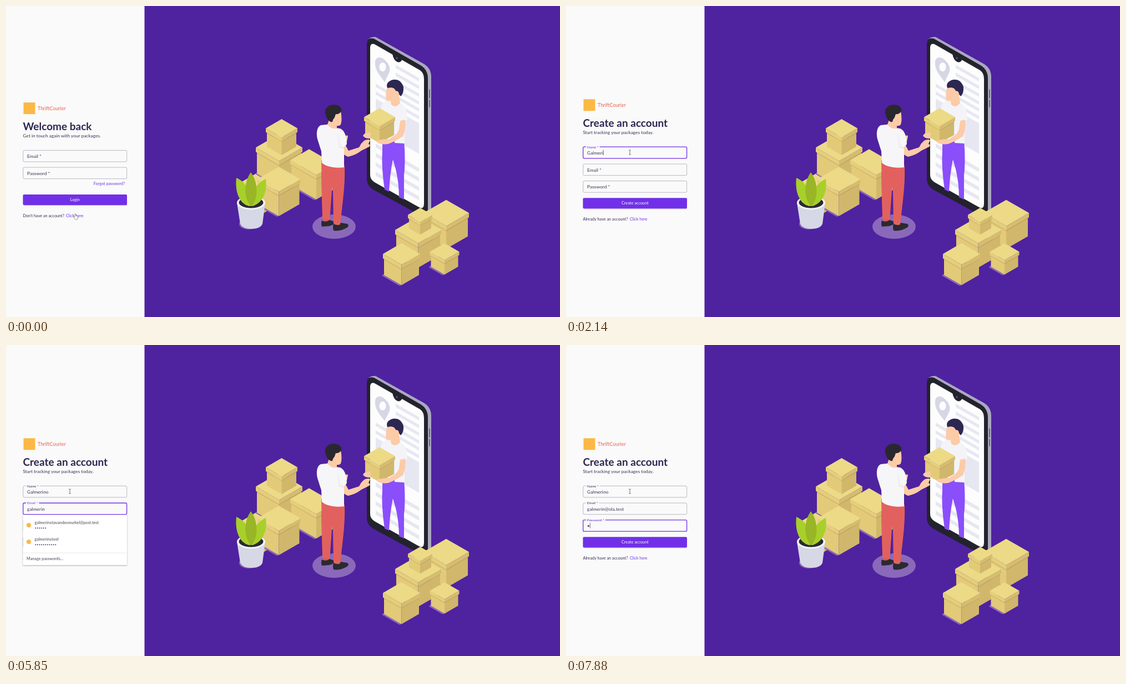
These frames come from a looping animation (998x561 px, 8 s). An HTML page with a canvas:

```html
<!DOCTYPE html>
<html lang="en">
<head>
<meta charset="utf-8">
<title>Sign up</title>
<style>
  html, body { margin: 0; width: 100%; height: 100%; overflow: hidden; background: #4f22a0; }
  canvas, svg { position: absolute; left: 0; top: 0; width: 100%; height: 100%; display: block; }
  text { font-family: Lato, sans-serif; white-space: pre; }
</style>
</head>
<body>
<canvas id="art" width="998" height="561"></canvas>
<svg id="ui" viewBox="0 0 998 561" preserveAspectRatio="none"></svg>
<script>
const LOOP = 8000;
const INK = '#3a2f53', VIOLET = '#7130e8', PAPER = '#fafafa', SHADE = '#8a69ba', SKIN = '#fccba8';

// ---------- illustration ----------
const ctx = document.getElementById('art').getContext('2d');

function shape(color, d) {
  ctx.fillStyle = color;
  ctx.fill(new Path2D(d));
}

function poly(color, pts) {
  shape(color, 'M' + pts.map(p => p.join(' ')).join('L') + 'Z');
}

function oval(color, x, y, rx, ry) {
  ctx.fillStyle = color;
  ctx.beginPath();
  ctx.ellipse(x, y, rx, ry, 0, 0, Math.PI * 2);
  ctx.fill();
}

// Isometric carton: x, y is the nearest corner of the lid top, a and b its reach left and right.
function carton(x, y, a, b, lid, h, shadow) {
  const s = 0.577, inset = 2, base = lid + h;
  const L = (d, v) => [x - d, y - d * s + v];
  const R = (d, v) => [x + d, y - d * s + v];
  const wall = (color, P, w, top, bottom) => poly(color, [P(0, top), P(w, top), P(w, bottom), P(0, bottom)]);
  if (shadow) poly(SHADE, [L(a - inset, base - 2), L(0, base), [x - 4, y + base + 1], [x - a - 2, y - a * s + base + 2]]);
  wall('#e2ca79', L, a - inset, lid, base);
  wall('#d1b76b', R, b - inset, lid, base);
  wall('#cfb566', L, a - inset, lid, lid + 1.3);
  wall('#c0a55c', R, b - inset, lid, lid + 1.3);
  wall('#e5ce7c', L, a, 0, lid);
  wall('#d5bc6f', R, b, 0, lid);
  poly('#ecda86', [[x, y], L(a, 0), [x - a + b, y - (a + b) * s], R(b, 0)]);
}

// Slanted bar on the phone screen.
function bar(x0, x1, y, h) {
  const drop = (x1 - x0) * 0.57;
  poly('#e7e7f2', [[x0, y], [x1, y + drop], [x1, y + drop + h], [x0, y + h]]);
}

function phone() {
  shape('#aaa8bf', 'M651 66Q653 54 666 56L752 104Q766 112 766 128L766 370L756 376L740 366Z');
  shape('#22232d', 'M650 70Q650 55 663 59L747 107Q760 115 760 131L760 368Q759 381 746 377L661 331Q650 324 650 312Z');
  const screen = 'M656 76Q656 66 664 69L746 116Q753 121 753 132L753 356Q753 368 744 363L664 318Q656 313 656 305Z';
  shape('#fdfdfe', screen);
  ctx.save();
  ctx.clip(new Path2D(screen));
  for (let i = 0; i < 4; i++) bar(702, 744, 106 + i * 14, 6);
  for (let i = 0; i < 2; i++) bar(666, 744, 140 + i * 14, 6);
  bar(666, 744, 167, 55);
  for (let i = 0; i < 4; i++) bar(666, 744, 248 + i * 17, 7);
  ctx.restore();
  shape('#d6d6e5', 'M665 101C666 92 674 90 682 97C690 104 694 113 690 121L682 137L676 129C669 120 664 111 665 101Z');
  oval('#fdfdfe', 678.5, 110, 6, 8);
  shape('#22232d', 'M696 86L714 96Q711 103 705 101Q698 98 696 86Z');
  oval('#4d4d5d', 704, 94, 1.8, 2.2);
  shape('#6c5f9d', 'M762 150L764 151L764 167L762 166ZM762 169L764 170L764 183L762 182Z');
}

function courier() {
  shape('#8a4efb', 'M678 246L717 242Q720 280 717 305L717 349L708 345Q708 320 702 294L697 277Q692 300 690 335L682 331Q676 290 678 262Z');
  shape('#f4f4f8', 'M691 169Q678 172 676 181L674 191L700 200L700 247L718 248L718 208L723 205Q723 184 712 176L707 172Z');
  shape(SKIN, 'M686 148Q683 163 685 170Q689 173 693 171L694 178Q702 185 710 175L708 163Q713 155 707 150L700 145Z');
  shape('#2d2653', 'M687 148Q683 137 697 133Q711 131 716 146Q717 157 711 163L708 159Q708 153 702 153Q700 147 693 147Z');
  carton(673, 216.5, 28, 28, 7, 24);
  shape(SKIN, 'M710 207L719 205Q721 222 715 235Q700 245 688 249Q671 251 667 244Q675 240 689 240Q703 235 708 223Z');
  shape(SKIN, 'M657 228Q645 228 643 234Q647 240 656 239Z');
}

function customer() {
  oval(SHADE, 591, 398, 39, 22);
  shape('#d95a5d', 'M588 318L583 389Q577 391 571 387L569 345L568 300Z');
  shape('#2b2a30', 'M569 387Q576 391 583 386L592 389Q592 395 582 397L569 398Q567 393 569 387Z');
  shape('#2b2a30', 'M590 393Q597 397 603 391L615 393Q620 397 612 401Q600 407 590 405Q588 399 590 393Z');
  shape('#e2615f', 'M568 278L610 288Q611 315 607 350L602 394Q596 397 590 392L589 335L587 325L583 385L570 384L569 345Z');
  shape(SKIN, 'M610 236Q615 231 616 235L614 244Q611 246 609 244Z');
  shape(SKIN, 'M600 253Q604 268 616 272Q630 269 640 261L654 254Q658 250 653 249L656 242Q653 239 645 243L640 248L636 255L617 261L611 250Z');
  shape('#f6f6f8', 'M567 215C559 219 559 231 561 240L568 262L569 283Q582 294 609 291L609 254Q614 251 614 248Q613 226 602 221Q590 220 585 213Z');
  shape('#e9e9ef', 'M597 226L602 253L609 255L609 258L600 255Z');
  shape(SKIN, 'M591 193L603 190Q606 205 603 214Q600 217 596 216L596 221Q587 223 579 214L582 205Z');
  shape('#29282e', 'M579 204C570 189 577 178 591 178C599 178 606 183 604 190Q600 196 594 195L592 201Q589 204 588 209Q583 210 579 204Z');
}

function plant() {
  oval(SHADE, 437, 393, 17, 10);
  shape('#d6d8e5', 'M416 355L422 393Q426 402 442 402Q458 402 462 393L467 355Z');
  oval('#f3f4f8', 441.5, 355, 25.5, 12.5);
  oval('#2a2a33', 441.5, 354.5, 22, 10);
  shape('#a7d02b', 'M438 361C420 357 412 334 415 310C432 317 444 337 440 361Z');
  shape('#a7d02b', 'M441 361C441 338 450 320 468 312C471 335 463 355 444 361Z');
  shape('#98b626', 'M441 361C426 343 430 315 441 300C453 315 456 343 443 361Z');
}

function scene() {
  ctx.fillStyle = '#4f22a0';
  ctx.fillRect(0, 0, 998, 561);
  carton(492, 279.5, 42, 42, 8, 38, true);
  carton(496.5, 237, 28.5, 28.5, 7, 25);
  carton(559, 305, 47, 34, 7, 37, true);
  carton(453, 340, 34, 30, 7, 33);
  carton(491.5, 335, 39, 39, 7, 37, true);
  plant();
  phone();
  courier();
  customer();
  carton(793, 397, 41, 41, 8, 33);
  carton(742.5, 428, 41.5, 41.5, 8, 36, true);
  carton(746, 389.5, 22, 22, 6, 17);
  carton(790, 458.5, 26.5, 26.5, 6, 20, true);
  carton(712.5, 466.5, 33.5, 33.5, 8, 29, true);
  ctx.fillStyle = PAPER;
  ctx.fillRect(0, 0, 249.5, 561);
}

// ---------- form ----------
const ui = document.getElementById('ui');

function el(tag, attrs, parent = ui) {
  const node = document.createElementNS('http://www.w3.org/2000/svg', tag);
  set(node, attrs);
  parent.append(node);
  return node;
}
function set(node, attrs) {
  for (const k in attrs) node.setAttribute(k, attrs[k]);
}
function show(node, on) {
  node.setAttribute('visibility', on ? 'visible' : 'hidden');
}
function label(parent, x, y, size, str, fill = INK, extra = {}) {
  const node = el('text', { x, y, 'font-size': size, fill, ...extra }, parent);
  node.textContent = str;
  return node;
}

function header(g, y, title, sub) {
  el('rect', { x: 31.5, y: y - 10.5, width: 21, height: 21, fill: '#fcb845' }, g);
  label(g, 57, y + 3.2, 8.9, 'ThriftCourier', '#e8604a');
  label(g, 30.5, y + 39.5, 19, title, '#2f2552', { 'font-weight': 700 });
  label(g, 30.5, y + 52.6, 8.32, sub);
}

function button(g, y, str) {
  el('rect', { x: 31, y: y + 1, width: 187, height: 19.3, rx: 2, fill: '#c9bfe2' }, g);
  el('rect', { x: 30.5, y, width: 187.5, height: 19, rx: 2, fill: VIOLET }, g);
  label(g, 124.3, y + 12, 7.35, str, '#fff', { 'text-anchor': 'middle' });
}

function footer(g, y, str, linkX) {
  label(g, 30.5, y, 7.28, str);
  label(g, linkX, y, 7.28, 'Click here', VIOLET);
}

function field(g, y, name) {
  const frame = el('rect', { x: 30.8, y, width: 186.8, height: 20.6, rx: 2, fill: 'none' }, g);
  const notch = el('rect', { x: 36, y: y - 1, height: 2, width: 0, fill: PAPER }, g);
  const tag = label(g, 0, 0, 8.32, name, INK, { 'letter-spacing': 0.08 });
  const value = label(g, 38, y + 13.6, 8.32, '', INK, { 'letter-spacing': 0.08 });
  const caret = el('rect', { y: y + 5.4, width: 0.7, height: 9.6, fill: INK }, g);

  // lift: 0 = label inside the field, 1 = label on its border
  return function update(str, focused, lift, caretOn, tagColor) {
    const k = 1 - 0.25 * lift;
    set(frame, { stroke: focused ? VIOLET : '#aaa9b5', 'stroke-width': focused ? 1.3 : 0.8 });
    set(tag, { transform: `translate(38 ${y + 13.6 - 11.3 * lift}) scale(${k})`, fill: tagColor });
    notch.setAttribute('width', lift ? lift * (tag.getComputedTextLength() * 0.75 + 4) : 0);
    if (value.textContent !== str) value.textContent = str;
    caret.setAttribute('x', 38 + (str ? value.getComputedTextLength() : 0));
    show(caret, focused && caretOn);
  };
}

function logins(rows) {
  const g = el('g', {});
  const ink = '#4a4458', split = 315 + rows.length * 30;
  el('rect', { x: 30.5, y: 306.5, width: 187.5, height: split - 284.5, fill: '#fff',
    style: 'filter:drop-shadow(0 1px 1px rgba(0,0,0,.32))' }, g);
  rows.forEach(([user, dots], i) => {
    const y = 325 + i * 30;
    el('circle', { cx: 41, cy: y, r: 4, fill: '#fcb845' }, g);
    label(g, 51.5, y - 2.4, 7.28, user, ink);
    for (let d = 0; d < dots; d++) el('circle', { cx: 53.3 + d * 3.6, cy: y + 5.2, r: 1.05, fill: ink }, g);
  });
  el('rect', { x: 30.5, y: split - 0.3, width: 187.5, height: 0.7, fill: '#dcdce0' }, g);
  label(g, 37, split + 13, 7.28, 'Manage passwords...', ink);
  return g;
}

scene();

const login = el('g', {});
header(login, 184.5, 'Welcome back', 'Get in touch again with your packages.');
[[260.4, 'Email *'], [291, 'Password *']].forEach(([y, s]) => field(login, y, s)('', false, 0, false, INK));
label(login, 214, 323.4, 7.28, 'Forgot password?', VIOLET, { 'text-anchor': 'end' });
button(login, 340, 'Login');
footer(login, 380.5, 'Don\u2019t have an account?', 108);

const signup = el('g', {});
header(signup, 178.7, 'Create an account', 'Start tracking your packages today.');
const fields = [[254.2, 'Name *'], [285, 'Email *'], [315.6, 'Password *']].map(([y, s]) => field(signup, y, s));
button(signup, 346.3, 'Create account');
footer(signup, 386.7, 'Already have an account?', 115);

const longUser = ['galmerinotavandesmurkel@post.test', 6], lastUser = ['galmerinotvel', 11];
const menuAll = logins([longUser, ['gal3@post.test', 4], lastUser]);
const menuTwo = logins([longUser, lastUser]);

const pointer = el('g', {});
const edge = { fill: '#fff', stroke: '#555', 'stroke-width': 0.6, 'stroke-linejoin': 'round' };
const hand = el('path', { d: 'M-1.2 -4.5Q0 -5.5 .8 -4.5V-1.5L4 -.6Q5 0 4.6 1.8L3.6 5H-.4L-3.3 1.2Q-3 0 -1.2 1Z', ...edge }, pointer);
const arrow = el('path', { d: 'M0 0V8.2L2 6.4L3.4 9.4L4.7 8.8L3.4 6H6Z', ...edge }, pointer);
const beam = el('path', { d: 'M-1.8 -4H-.4L0 -3.5L.4 -4H1.8M-1.8 4H-.4L0 3.5L.4 4H1.8M0 -3.5V3.5',
  fill: 'none', stroke: '#333', 'stroke-width': 0.7 }, pointer);

// ---------- timeline ----------
const SWAP = 310;
const entries = [
  { focus: 850, text: 'Galmerino', keys: [1350, 1500, 1660, 1840, 1940, 2040, 2140, 2290, 2700] },
  { focus: 2920, text: 'galmerin@ola.test', keys: [4100, 4280, 4440, 4640, 4760, 4850, 4940, 5250, 6100,
    6460, 6620, 6760, 6910, 7100, 7230, 7430, 7520] },
  { focus: 7600, text: '\u2022', keys: [7880] }
];

const clamp = v => Math.max(0, Math.min(1, v));
const ease = v => 1 - (1 - clamp(v)) ** 3;

function render(t) {
  show(login, t < SWAP);
  signup.setAttribute('display', t < SWAP ? 'none' : 'inline');

  if (t >= SWAP) entries.forEach(({ focus, text, keys }, i) => {
    const next = entries[i + 1];
    const blur = next ? next.focus : Infinity;
    const count = keys.filter(k => k <= t).length;
    const last = count ? keys[count - 1] : focus;
    const focused = t >= focus && t < blur;
    const caretOn = Math.floor((t - last) / 580) % 2 === 0;
    const violet = t > focus + 40 && t < blur + 120;
    fields[i](text.slice(0, count), focused, ease((t - focus - 20) / 200), caretOn, violet ? VIOLET : INK);
  });

  show(menuAll, t >= 4160 && t < 4700);
  show(menuTwo, t >= 4700 && t < 6180);

  const p = clamp((t - 350) / 480), m = p * p * (3 - 2 * p);
  const x = 125 - 10 * m, y = 380 - 116 * m;
  pointer.setAttribute('transform', `translate(${x} ${y})`);
  const overInput = t >= SWAP && [254, 285, 315.6].some(top => y >= top && y <= top + 21);
  const overLink = t < SWAP || y > 379;
  show(hand, overLink);
  show(beam, overInput);
  show(arrow, !overLink && !overInput);
}

const start = performance.now();
function tick() {
  render((performance.now() - start) % LOOP);
  requestAnimationFrame(tick);
}
tick();
</script>
</body>
</html>
```
